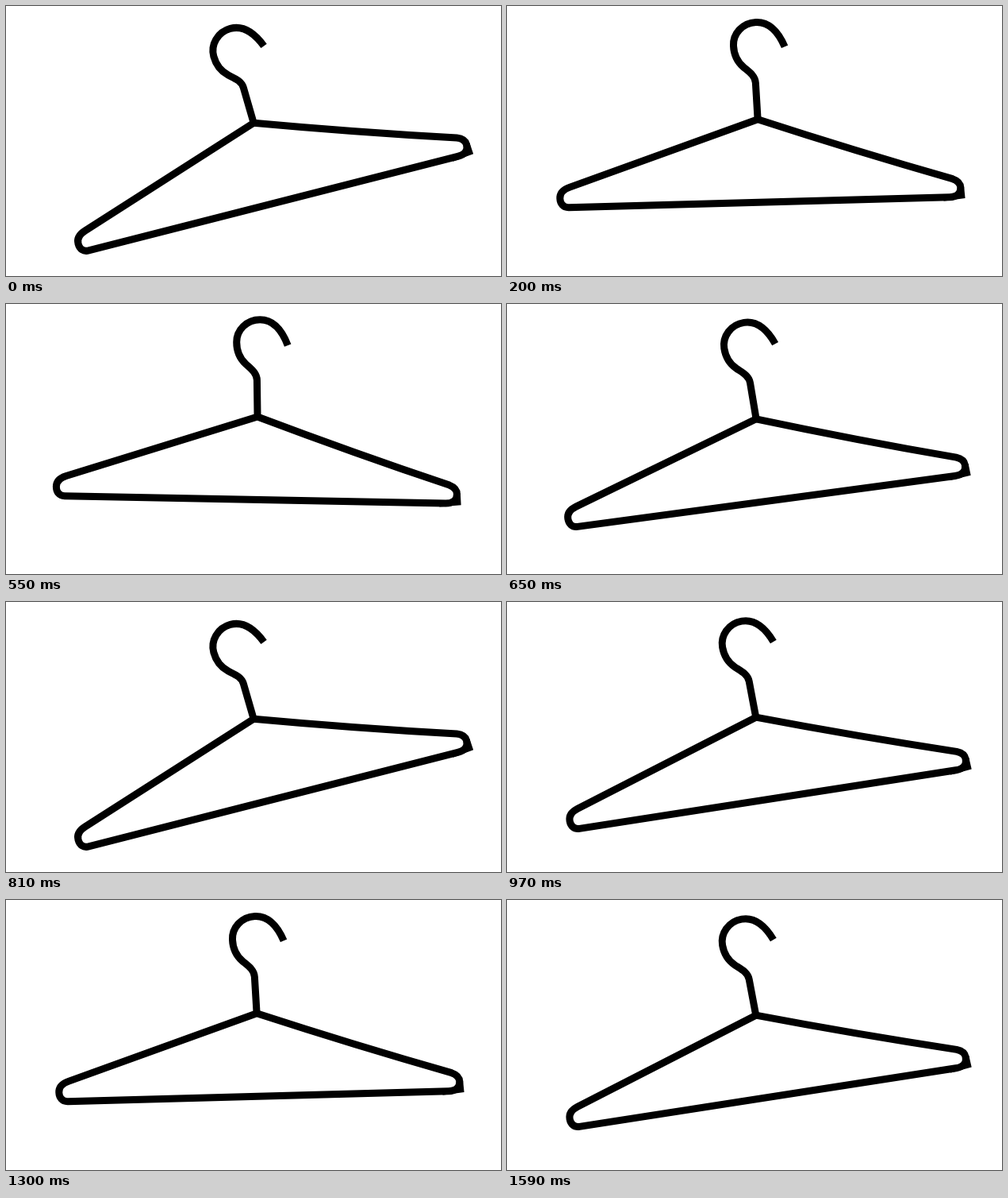
These frames come from a looping animation (624x340 px, 1670 ms). An HTML page with a canvas:

```html
<!DOCTYPE html>
<html lang="en">
<head>
<meta charset="utf-8">
<title>Swinging hanger</title>
<style>
  html, body { margin: 0; width: 100%; height: 100%; overflow: hidden; background: #fff; }
  canvas { display: block; }
</style>
</head>
<body>
<canvas id="stage" width="624" height="340"></canvas>
<script>
const ctx = document.getElementById('stage').getContext('2d');
const PIVOT = { x: 334, y: 162.5 };
const START = -15.3;   // degrees, far left of the swing
const RANGE = 25.9;
const POSES = 15;      // poses in one full swing
const PEAK = 8.1;      // pose at the far right
const STEPS = 26;
const TURN = 21;       // step where playback reverses
const PAUSE = 23;

// Mostly steady motion, softened at both ends.
const ease = u => 0.66 * u + 0.17 * (1 - Math.cos(Math.PI * u));

function angleAt(step) {
  const pose = (TURN - Math.abs(step - TURN)) % POSES;
  const u = pose < PEAK ? pose / PEAK : (POSES - pose) / (POSES - PEAK);
  return START + RANGE * ease(u);
}

function holdOf(step) {
  if (step === PAUSE) return 210;
  if (step < 13) return 50;
  return Math.abs(step - TURN) <= 1 ? 30 : 80;
}

let loop = 0;
for (let i = 0; i < STEPS; i++) loop += holdOf(i);

function stepAt(t) {
  let step = 0;
  while (t >= holdOf(step)) t -= holdOf(step++);
  return step;
}

const hook = new Path2D(
  'M355 52 C347 31 336 19.7 320 19.7 C303 19.7 290.5 33 290.5 48 ' +
  'C290.5 60 294.5 68.5 302 75.5 C308.5 81.5 316.3 87 316.3 96 L317 142'
);
const frame = new Path2D(
  'M317 142 Q438 187.3 559 227.7 Q568.6 231.5 568.6 239 C568.6 247 563 250.7 554 250.6 ' +
  'L74 242.2 C67 242 63.5 237 63.5 230.5 C63.5 224 68 219.5 76 217 Z'
);
const corner = new Path2D('M566 236 L573 238 L573.8 252.8 L546 255.2 L556 250 L566 246 Z');

function draw(angle) {
  ctx.setTransform(1, 0, 0, 1, 0, 0);
  ctx.fillStyle = '#fff';
  ctx.fillRect(0, 0, 624, 340);
  ctx.translate(PIVOT.x, PIVOT.y);
  ctx.rotate(angle * Math.PI / 180);
  ctx.translate(-PIVOT.x, -PIVOT.y);
  ctx.strokeStyle = ctx.fillStyle = '#000';
  ctx.lineWidth = 9;
  ctx.lineJoin = 'round';
  ctx.stroke(hook);
  ctx.stroke(frame);
  ctx.fill(corner);
}

function tick() {
  draw(angleAt(stepAt(performance.now() % loop)));
  requestAnimationFrame(tick);
}
tick();
</script>
</body>
</html>
```
